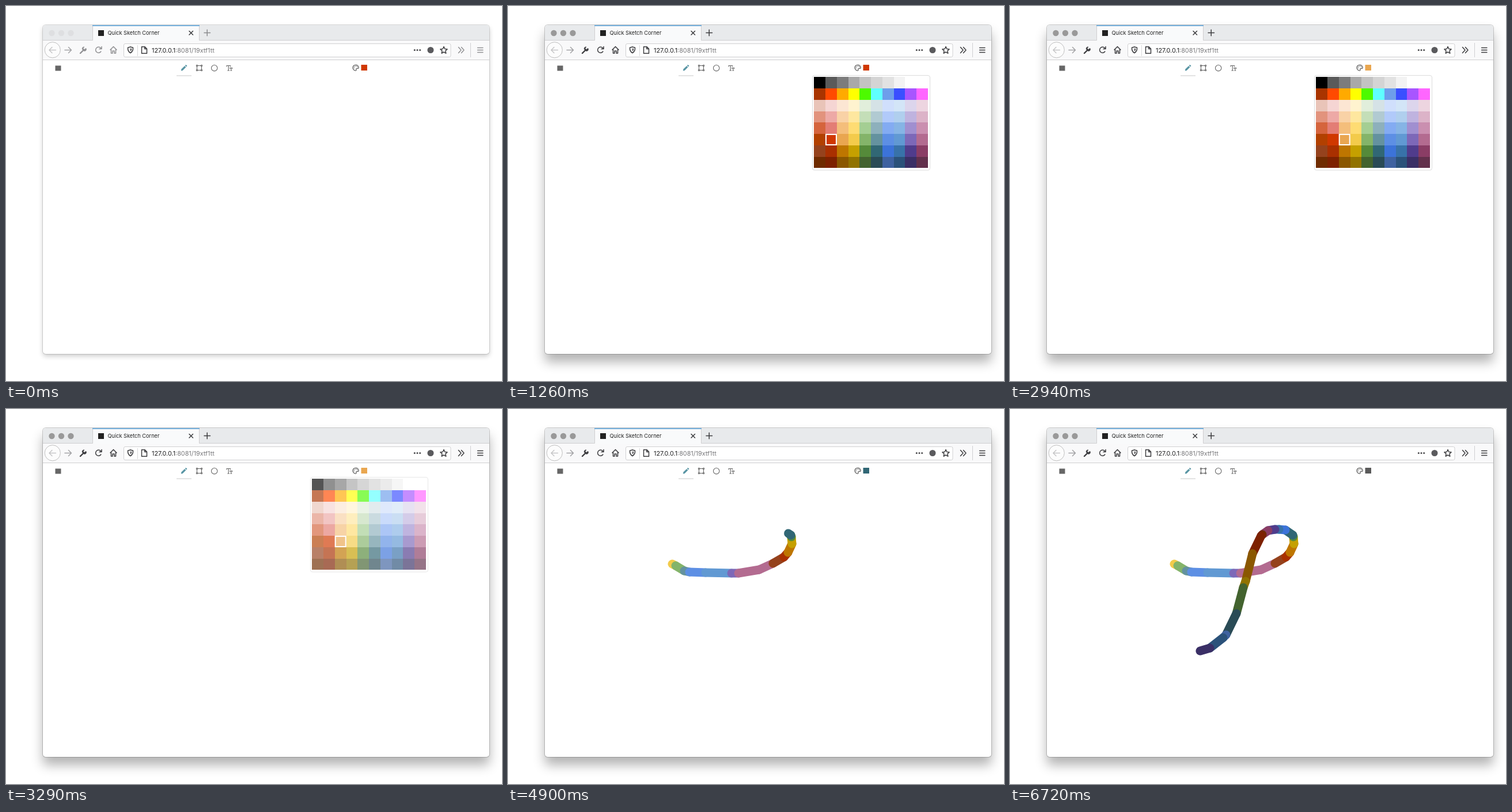
An HTML page for the animation above (6790 ms loop, 861 by 651 pixels).

```html
<!DOCTYPE html>
<html lang="en">
<head>
<meta charset="utf-8">
<title>Quick Sketch Corner</title>
<style>
  html, body { margin: 0; width: 100%; height: 100%; overflow: hidden; background: #fff; }
  #window { position: absolute; left: 64px; top: 33px; width: 775px; height: 571px; border-radius: 5px;
    background: #fff; box-shadow: 0 0 0 1px #0003, 0 14px 20px #0000004d; }
  #window.idle { box-shadow: 0 0 0 1px #0002, 0 4px 9px #0003; }
  svg { position: absolute; left: 0; top: 0; }
  text { font-family: Inter, "Open Sans", sans-serif; }
  .icon { fill: none; stroke: #3c3c3f; stroke-width: 1.5; stroke-linecap: round; stroke-linejoin: round; }
  .tool { stroke: #666; stroke-width: 1.1; }
</style>
</head>
<body>
<div id="window"></div>
<svg width="861" height="651" viewBox="0 0 861 651">
  <!-- tab strip -->
  <path d="M64 60V38a5 5 0 0 1 5-5H834a5 5 0 0 1 5 5V60Z" fill="#e8eaec"/>
  <rect x="64" y="60" width="775" height="33" fill="#f9f9fa"/>
  <path d="M64 59.5H150.5V34M335.5 34V59.5H839M64 93.5H839M806.5 64V89" fill="none" stroke="#cfcfd1"/>
  <rect x="151" y="33" width="184" height="28" fill="#f9fafb"/>
  <rect x="150" y="33" width="186" height="2" fill="#76b0dc"/>
  <g id="lights"><circle cx="79.5" cy="47" r="5.2"/><circle cx="96" cy="47" r="5.2"/><circle cx="112.5" cy="47" r="5.2"/></g>
  <rect x="160" y="42" width="10" height="10" fill="#222"/>
  <text x="176.5" y="50.3" font-size="9.2" fill="#222">Quick Sketch Corner</text>
  <path class="icon" d="M318 43.5l6.5 6.5M324.5 43.5l-6.5 6.5"/>

  <!-- navigation -->
  <circle cx="80.8" cy="76.3" r="13.6" fill="#fcfcfc" stroke="#bfbfbf"/>
  <path class="icon" style="stroke:#c6c6c8" d="M86.500 76.500H75.500M80 71.500l-5 5 5 5"/>
  <path class="icon" style="stroke:#a3a3a6" d="M102 76.500H113M108.500 71.500l5 5-5 5"/>
  <g id="controls" class="icon">
    <path d="M344 46.500h10.500M349.200 41.200v10.500"/>
    <path d="M129 82l5-5" stroke-width="2.4"/>
    <path d="M138.500 73.500l-2.500 2-2-2 2-2.500c-3-.5-4.500 2-3.500 4.500l2.500 2.500c2.500 1 5-.5 4.500-3.500Z" fill="#3c3c3f" stroke-width=".6"/>
    <path d="M164.800 79a5 5 0 1 1 0-5.500M166 70.500v4h-4"/>
    <path d="M181 76l5.500-5.500 5.500 5.500M182.500 75.500v6.500h2.500v-4h3v4h2.500v-6.500"/>
    <path d="M785.500 71.500l4.500 5-4.500 5M790.500 71.500l4.500 5-4.500 5"/>
    <path d="M818.500 72.500h9.500M818.500 76.500h9.500M818.500 80.500h9.500" stroke-width="1.3"/>
  </g>

  <!-- address bar -->
  <rect x="204.500" y="65.500" width="567.500" height="23" rx="2.500" fill="#fff" stroke="#d0d0d2"/>
  <path d="M228.500 68V87" stroke="#d8d8da"/>
  <g class="icon" stroke-width="1.3">
    <path d="M216 71l4.500 1.300c.3 5-1.500 7.700-4.500 9.200-3-1.500-4.800-4.200-4.500-9.200Z"/>
    <path d="M216 73.500v5.500c1.500-1.200 2-2.800 2-5Z" fill="#3c3c3f" stroke="none"/>
    <path d="M235.500 70.800h5.500l3.500 3.500v8h-9ZM240.800 71v3.500h3.500"/>
    <path d="M760 70.500l1.800 4 4.300.5-3.200 2.900.9 4.300-3.800-2.200-3.800 2.200.9-4.300-3.200-2.900 4.300-.5Z"/>
  </g>
  <g fill="#4a4a4d"><circle cx="709.300" cy="76.500" r="1.500"/><circle cx="714" cy="76.500" r="1.500"/><circle cx="718.700" cy="76.500" r="1.500"/>
    <circle cx="737" cy="76.500" r="5.500" fill="#5a5a5d"/></g>
  <text x="253" y="80.600" font-size="10.800" fill="#1c1c1e">127.0.0.1<tspan fill="#77777a">:8081/19xtf1tt</tspan></text>

  <!-- drawing tools -->
  <rect x="85.500" y="103.500" width="10" height="9" fill="#666"/>
  <path d="M303.800 112.500l.6-2.900 5.700-5.700 2.300 2.300-5.700 5.700ZM310.800 103.200l1-1q.5-.5 1 0l1.300 1.300q.5.500 0 1l-1 1Z" fill="#5a96a5"/>
  <path d="M296 121H322" stroke="#dadada" stroke-width="1.500"/>
  <g class="icon tool">
    <path d="M332.500 103.500h6M332.500 111.500h6M331.500 104.500v6M339.500 104.500v6"/>
    <path d="M330.500 102.500h2v2h-2ZM338.500 102.500h2v2h-2ZM330.500 110.500h2v2h-2ZM338.500 110.500h2v2h-2Z"/>
    <circle cx="361.700" cy="107.700" r="5.200"/>
    <path d="M383 105v-1.500h6.500v1.500M386.200 103.500v8.500M384.800 112h2.800M388.800 108.500v-1h4v1M390.800 107.500v4.500M389.800 112h2"/>
    <path stroke="#444" d="M607 102.200a5 5 0 0 0 0 10c1.500 0 1.200-1.200.9-1.900-.4-1 .2-1.800 1.200-1.800h1.600c3 0 1.300-6.300-3.700-6.300Z"/>
    <path stroke="#444" stroke-width="1.500" d="M604.200 107.500v0M605 105v0M607.500 104.200v0M609.800 105.700v0"/>
  </g>
  <rect id="swatch" x="616.500" y="102" width="10.500" height="10"/>
  <g id="stroke" fill="none" stroke-width="15" stroke-linecap="round"></g>

  <g id="picker">
    <rect x="528.500" y="120.500" width="204" height="164.500" rx="3.500" fill="#fff" stroke="#dcdcdc"/>
    <g id="cells" shape-rendering="crispEdges"></g>
    <rect id="mark" width="18" height="18" fill="none" stroke="#fff" stroke-width="2"/>
  </g>
</svg>
<script>
const LOOP = 6790, STEP = 70, CELL = 19.75, LEFT = 531.3, TOP = 123.3;
const $ = id => document.getElementById(id);

const palette = `
000000 5a5a5a 7c7c7c a9a9a9 c3c3c3 d4d4d4 e2e2e2 f3f3f3 ffffff ffffff
a93400 ff4a00 ffaa00 ffff00 4dfa00 5fffff 6d9eeb 3a4fff a855ff ff66ff
e9c4b8 f5d5d3 fce6d3 fff3cf e1eedb d5e2e6 d0dffc d3e5f7 dcd5ec edd5e0
e2937d eda9a6 f9d2a6 fee79f c4deb8 b1cad2 b1cafa b0cfee bfb3df dcb3c8
d5643d e37d75 f4be7b fedc73 a4ce93 8db0bc 83abf2 86b4e5 a08fd0 ca8fb0
b24000 d03800 e9a650 f3cb4b 84b46a 64929f 5d8fe4 6199d3 7d68b8 b36b90
95421d a93000 be7600 c5a000 558a3a 316775 3c73d9 3872a9 503c8c 8a3d65
6f2b00 7d2100 8a5700 917300 43632f 2a4b56 3f62a0 2b527a 3a2f66 62304c`
  .trim().split(/\s+/).map(c => '#' + c);

$('cells').innerHTML = palette.map((c, i) =>
  `<rect x="${LEFT + i % 10 * CELL}" y="${TOP + Math.floor(i / 10) * CELL}" width="${CELL}" height="${CELL}" fill="${c}"/>`).join('');

// The pen takes the next palette colour at every knot but one.
const FIRST = 53, PLAIN_KNOT = 7;
const knots = `285,269 291,272 306,281 315,283 343,284 388,285 400,285 436,279 460,268 479,257 486,249
  493,234 492,222 491,219 478,210 467,209 460,209 448,211 438,218 436,220 421,251 409,299 405,310
  393,355 375,392 370,397 347,415 330,420`.split(/\s+/).map(p => p.split(',').map(Number));
const spans = knots.slice(1).map(([x, y], i) => ({
  from: knots[i], dx: x - knots[i][0], dy: y - knots[i][1],
  length: Math.hypot(x - knots[i][0], y - knots[i][1]),
  color: FIRST + i - (i >= PLAIN_KNOT)
}));
const total = spans.reduce((sum, s) => sum + s.length, 0);

const clamp = v => Math.max(0, Math.min(1, v));

// Draws the line up to the given share of its length; returns the colour at the tip.
function drawStroke(share) {
  let left = share * total, tip = FIRST, out = '';
  for (const s of spans) {
    const k = clamp(left / s.length);
    out += `<path d="M${s.from}l${s.dx * k},${s.dy * k + .01}" stroke="${palette[s.color]}"/>`;
    tip = s.color;
    left -= s.length;
    if (left <= .001) break;
  }
  $('stroke').innerHTML = out;
  return tip;
}

function colorAt(t) {
  if (t < 1890) return 51;
  if (t < 2660) return 55;
  if (t < 4270) return 52;
  if (t < 5460) return FIRST;
  return t < 5530 ? 79 : t < 5600 ? 0 : 1;
}

function render(t) {
  const idle = t < 490;
  $('window').className = idle ? 'idle' : '';
  $('lights').setAttribute('fill', idle ? '#dedfe1' : '#999');
  $('controls').setAttribute('opacity', idle ? .55 : 1);

  let color = colorAt(t);
  $('stroke').innerHTML = '';
  if (t >= 4480) {
    const tip = drawStroke(clamp((t - 4480) / 910));
    if (t < 5460) color = tip;
  }
  $('swatch').setAttribute('fill', palette[color]);

  const shown = clamp(Math.min((t - 910) / 210, (3430 - t) / 210));
  $('picker').setAttribute('opacity', shown);
  $('picker').setAttribute('transform', `translate(0 ${-6 * (1 - shown)})`);
  $('mark').setAttribute('x', LEFT + color % 10 * CELL + .9);
  $('mark').setAttribute('y', TOP + Math.floor(color / 10) * CELL + .9);
}

let last = -1;
function tick() {
  const t = Math.floor(performance.now() % LOOP / STEP) * STEP;
  if (t !== last) render(last = t);
  requestAnimationFrame(tick);
}
tick();
</script>
</body>
</html>
```
